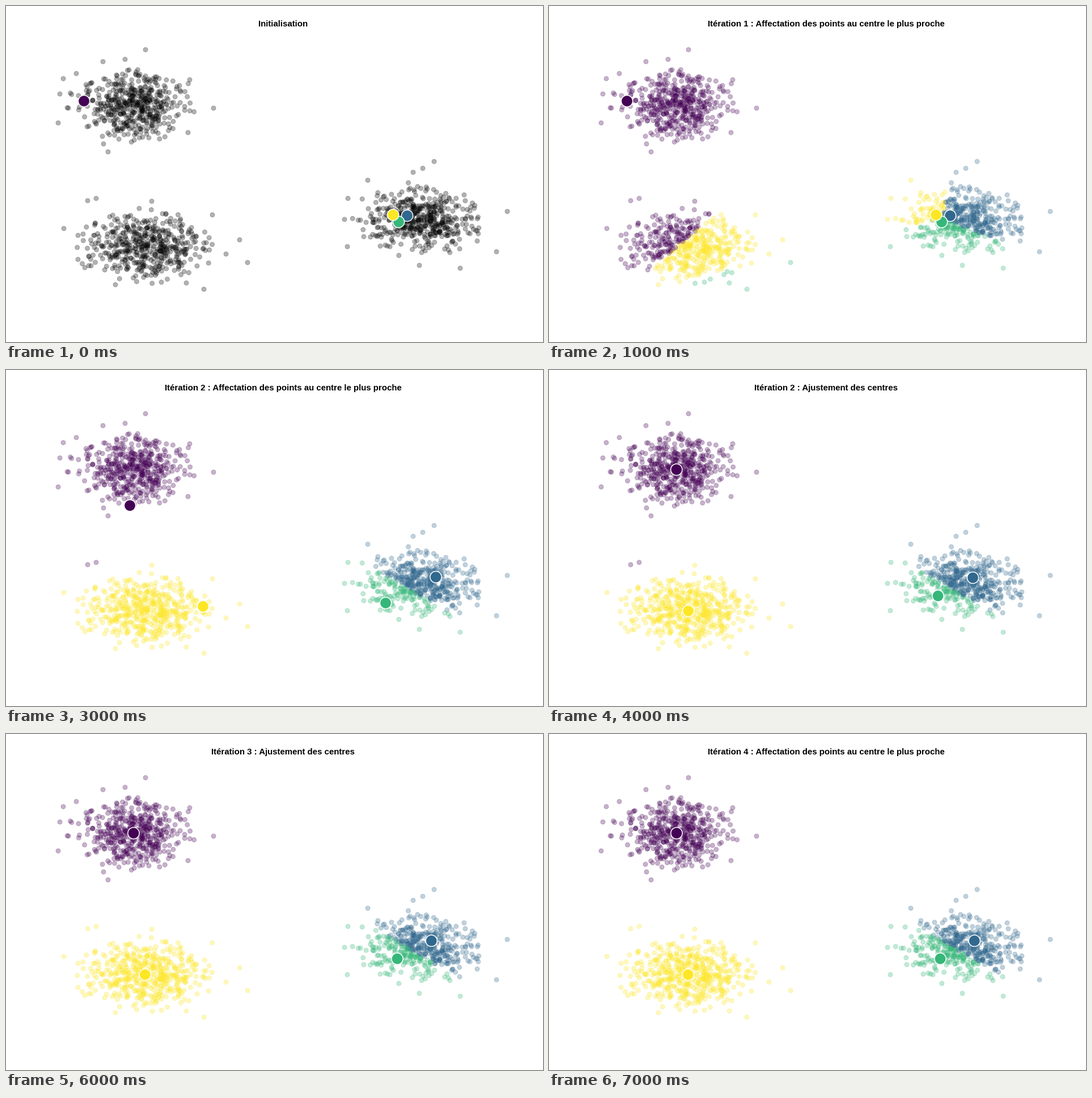
Recreate the animation shown at these times as a matplotlib script. Size 947 px wide and 592 px high, loop 8 s.

```python
import numpy as np
import matplotlib.pyplot as plt
from matplotlib.animation import FuncAnimation
from matplotlib.colors import to_rgba

W, H, DPI = 947, 592, 72
Y_WEIGHT = 3.19   # squared ratio of vertical to horizontal data scale
PALETTE = ["#440154", "#31688E", "#35B779", "#FDE725"]
ALPHA = 0.3

# Each blob: centre, spread, then its farthest points.
BLOBS = [
    ((225, 174), (50, 28), [
        (246, 77), (210, 94), (171, 98), (124, 119), (101, 128), (95, 155),
        (92, 206), (172, 243), (180, 257), (321, 223), (366, 180),
        (324, 130)]),
    ((245, 424), (52, 29), [
        (144, 343), (159, 339), (257, 344), (102, 392), (139, 461),
        (193, 491), (349, 499), (318, 488), (388, 437), (426, 452),
        (412, 412), (364, 368)]),
    ((728, 375), (51, 28.5), [
        (755, 274), (735, 286), (718, 293), (638, 307), (603, 339),
        (597, 376), (602, 424), (729, 457), (801, 462), (831, 414),
        (865, 433), (884, 362)]),
]

# Cluster centres after each adjustment, in palette order.
CENTRES = np.array([
    [(137.5, 167.5), (707.5, 369.5), (692.5, 380.5), (682.5, 368)],
    [(218.5, 238.8), (758, 364.8), (669.5, 410.5), (347.5, 416.5)],
    [(224.8, 175.5), (747.5, 366), (686, 398), (245.7, 424.5)],
    [(225, 174.7), (750.2, 364.3), (690, 396), (245.3, 424)],
])


def blob(rng, centre, spread, outliers, total=500, reach=2.4):
    z = rng.normal(size=(2 * total, 2))
    z = z[np.hypot(*z.T) < reach][:total - len(outliers)]
    pts = np.vstack([np.array(centre) + z * spread, outliers])
    return rng.permutation(pts)


def nearest(pts, centres):
    d = pts[:, None] - centres[None]
    return (d[..., 0] ** 2 + Y_WEIGHT * d[..., 1] ** 2).argmin(axis=1)


def area(radius):
    return (2 * radius) ** 2


rng = np.random.default_rng(12)
points = np.vstack([blob(rng, *b) for b in BLOBS])
groups = [nearest(points, c) for c in CENTRES]
tints = np.array([to_rgba(c, ALPHA) for c in PALETTE])
black = np.tile(to_rgba("black", ALPHA), (len(points), 1))

fig = plt.figure(figsize=(W / DPI, H / DPI), dpi=DPI, facecolor="white")
ax = fig.add_axes([0, 0, 1, 1])
ax.set(xlim=(0, W), ylim=(H, 0))
ax.axis("off")

dots = ax.scatter(*points.T, s=area(4.05), c=black, edgecolors=black,
                  linewidths=0.75)
hubs = ax.scatter(*CENTRES[0].T, s=area(10.1), c=PALETTE, edgecolors="white",
                  linewidths=1.5, zorder=3)
title = ax.text(488.7, 35.6, "", ha="center", va="baseline", color="black",
                family="Liberation Sans", weight="bold", size=14.95)


def draw(step):
    # Odd steps assign the points, even steps move the centres.
    rnd = (step + 1) // 2
    if step == 0:
        label, colors = "Initialisation", black
    else:
        action = ("Affectation des points au centre le plus proche"
                  if step % 2 else "Ajustement des centres")
        label = f"Itération {rnd} : {action}"
        colors = tints[groups[rnd - 1]]
    title.set_text(label)
    dots.set_facecolors(colors)
    dots.set_edgecolors(colors)
    hubs.set_offsets(CENTRES[step // 2])
    return dots, hubs, title


anim = FuncAnimation(fig, draw, frames=8, interval=1000, repeat=True,
                     repeat_delay=0, blit=False)
plt.show()
```
